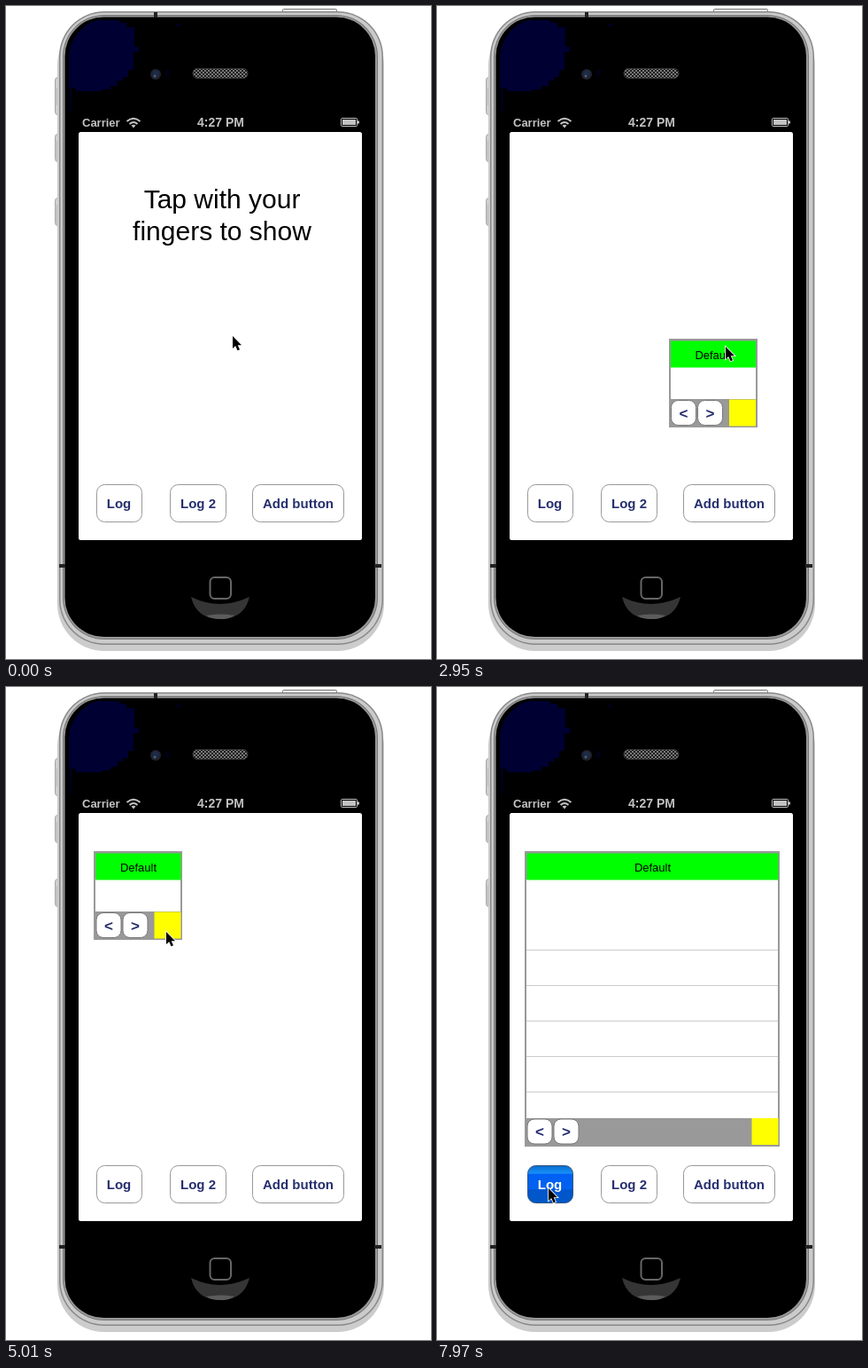
Write an HTML page that moves like this. It is 480 px wide and 736 px high and loops after 8 s.

```html
<!DOCTYPE html>
<html lang="en">
<head>
<meta charset="utf-8">
<title>Floating log window</title>
<style>
html, body { margin: 0; width: 100%; height: 100%; overflow: hidden; background: #fff; }
svg { display: block; }
text { font-family: "Liberation Sans", Arial, sans-serif; }
.mid { text-anchor: middle; }
.status { font-weight: bold; fill: #c2c2c2; }
.caption { font-size: 30px; text-anchor: middle; }
.button rect { fill: #fff; stroke: #999; }
.button text, .nav text { font-size: 15px; font-weight: bold; fill: #262f6e; text-anchor: middle; }
.nav rect { fill: #fff; stroke: #777; }
.nav text { font-size: 17px; }
.pressed rect { fill: url(#blue); stroke: #35527c; }
.pressed text { fill: #fff; }
</style>
</head>
<body>
<svg id="stage" width="480" height="736" viewBox="0 0 480 736">
  <defs>
    <linearGradient id="blue" x1="0" y1="0" x2="0" y2="1">
      <stop offset="0" stop-color="#0a6ccc"/>
      <stop offset=".2" stop-color="#1690f8"/>
      <stop offset=".24" stop-color="#0060f4"/>
      <stop offset=".62" stop-color="#0062ee"/>
      <stop offset=".66" stop-color="#0055cc"/>
      <stop offset="1" stop-color="#0058c8"/>
    </linearGradient>
    <linearGradient id="metal">
      <stop offset="0" stop-color="#bbb"/>
      <stop offset=".5" stop-color="#eee"/>
      <stop offset="1" stop-color="#777"/>
    </linearGradient>
    <pattern id="mesh" width="4" height="4" patternUnits="userSpaceOnUse">
      <rect width="4" height="4" fill="#1c1c1c"/>
      <path d="M0 0h2v2h-2zM2 2h2v2h-2z" fill="#777"/>
    </pattern>
  </defs>

  <!-- side and top keys -->
  <rect x="312.5" y="3.5" width="61" height="8" rx="1" fill="#eee" stroke="#777"/>
  <g fill="url(#metal)" stroke="#aaa">
    <rect x="55.5" y="80.5" width="8" height="42" rx="3"/>
    <rect x="55.5" y="144.5" width="8" height="31" rx="3"/>
    <rect x="55.5" y="216.5" width="8" height="31" rx="3"/>
  </g>
  <path d="M58.500 92v20M58.500 152v22M58.500 224v22" stroke="#777" stroke-width="1.500"/>

  <!-- body -->
  <rect x="58" y="14" width="369" height="713" rx="53" fill="#ccc"/>
  <rect x="60" y="6" width="366" height="714" rx="51" fill="#888"/>
  <rect x="61.500" y="7.500" width="363" height="711" rx="49.500" fill="#cbcbcb"/>
  <rect x="64" y="10" width="356" height="704" rx="47" fill="#777"/>
  <rect x="65" y="11" width="354" height="702" rx="46" fill="#999"/>
  <rect x="66.500" y="12.500" width="350.500" height="698.500" rx="44" fill="#000"/>
  <path d="M169 7v6M60 631h7M416 631h8" stroke="#222" stroke-width="4"/>
  <path d="M71 56Q73 32 96 18L104 16H128V19H136V24H145V46H150V52H144V72H138V80H132V84H126V90H118V94H108V96H79V92H71Z" fill="#003"/>
  <path d="M71 92h4v28h-3zM180 72h4v8h-4zM192 20h7v3h-7z" fill="#000018"/>

  <!-- camera, speaker, home key -->
  <circle cx="169" cy="77" r="6" fill="#22222c"/>
  <circle cx="169" cy="76" r="3.500" fill="#1b2c4c"/>
  <circle cx="168" cy="79" r="1.500" fill="#4a6078"/>
  <rect x="211" y="70.500" width="62" height="11" rx="5" fill="url(#mesh)" stroke="#333"/>
  <path d="M209 666Q242 682 275 666Q269 691 242 691Q215 691 209 666Z" fill="#353535"/>
  <path d="M226 687Q242 684 258 687Q252 691 242 691Q232 691 226 687Z" fill="#5c5c5c"/>
  <rect x="230.500" y="644" width="23.500" height="24" rx="5" fill="#000" stroke="#666" stroke-width="2"/>

  <!-- status bar -->
  <text class="status" x="86" y="136" font-size="13">Carrier</text>
  <text class="status mid" x="242.500" y="136" font-size="14">4:27 PM</text>
  <g fill="none" stroke="#c2c2c2" stroke-width="2">
    <path d="M136.500 130Q144 123.500 151.500 130M139.500 133Q144 129 148.500 133"/>
    <path d="M141.500 134.500Q144 133 146.500 134.500L144 137.500Z" fill="#c2c2c2" stroke="none"/>
    <rect x="378.500" y="126.500" width="18" height="9" rx="1" stroke-width="1"/>
    <path d="M380 131h15" stroke-width="6"/>
    <path d="M398 129.500v3" stroke-width="2"/>
  </g>
  <rect x="82" y="142" width="320" height="460" rx="2.500" fill="#fff"/>

  <g class="button" id="log"><rect x="102.500" y="539.500" width="51" height="42" rx="9"/><text x="127.500" y="566">Log</text></g>
  <g class="button"><rect x="185.500" y="539.500" width="63" height="42" rx="9"/><text x="217" y="566">Log 2</text></g>
  <g class="button"><rect x="278.500" y="539.500" width="103" height="42" rx="9"/><text x="330" y="566">Add button</text></g>

  <!-- floating window: the frame and table sit on whole pixels, title and bar may not -->
  <svg id="win">
    <rect width="100%" height="100%" fill="#999"/>
    <svg id="table" x="2" y="32">
      <rect width="100%" height="100%" fill="#fff"/>
      <path id="rows" stroke="#ccc"/>
    </svg>
    <g id="head">
      <rect id="title" x="2" y="2" height="30" fill="#0f0"/>
      <text class="mid" x="50%" y="22" font-size="13">Default</text>
    </g>
    <g id="bar">
      <g class="nav"><rect x="2.500" y="1" width="28" height="28" rx="8"/><text x="16.500" y="21">&lt;</text></g>
      <g class="nav"><rect x="32.500" y="1" width="28" height="28" rx="8"/><text x="46.500" y="21">&gt;</text></g>
      <rect id="grip" width="30" height="30" fill="#ff0"/>
    </g>
  </svg>

  <g class="caption">
    <g id="tap"><text x="244" y="228">Tap with your</text><text x="244" y="264">fingers to show</text></g>
    <text id="drag" x="231" y="247">drag</text>
    <text id="logging" x="245.500" y="468">log to window</text>
  </g>
  <path id="cursor" d="M0 0V14L3.200 11L5.500 16.200L8 15.200L5.700 10.200H10Z" stroke="#fff" stroke-width="1.600" paint-order="stroke"/>
</svg>
<script>
const LOOP = 8000, STEP = 40;
const $ = id => document.getElementById(id);

// Tables of [time, a, b]
const pointer = [
  [500, 256, 372], [1300, 153, 236], [2630, 153, 236], [2910, 333, 390],
  [2950, 326, 384], [3390, 181, 200], [3470, 181, 200], [3710, 181, 276],
  [5010, 181, 276], [5450, 369, 509], [5530, 369, 509], [5850, 125, 564],
  [7890, 125, 564], [7930, 126, 565]
];
const place = [[2630, 82, 222], [2950, 262, 375.5], [3390, 102, 195.5], [3470, 99.5, 185.5]];
const size = [[5010, 100, 100], [5450, 288, 332.5]];
const bursts = [5010, 2630, 500];

const half = v => Math.round(v * 2) / 2;

function at(keys, t) {
  const i = keys.findIndex(k => k[0] > t);
  if (i < 0) return keys[keys.length - 1].slice(1);
  if (i === 0) return keys[0].slice(1);
  const [t0, a0, b0] = keys[i - 1], [t1, a1, b1] = keys[i];
  const u = (t - t0) / (t1 - t0), e = u * u * (3 - 2 * u);
  return [half(a0 + (a1 - a0) * e), half(b0 + (b1 - b0) * e)];
}

// Motion advances in steps, counted from the start of each burst
function snap(t) {
  const start = bursts.find(b => t >= b) ?? 0;
  return start + Math.floor((t - start) / STEP) * STEP;
}

function set(id, attrs) {
  for (const name in attrs) $(id).setAttribute(name, attrs[name]);
}

function move(id, x, y) {
  set(id, { transform: `translate(${x} ${y})` });
}

function show(id, on) {
  $(id).style.display = on ? "" : "none";
}

function lines(first, pitch, count) {
  return Array.from({ length: count }, (_, i) => `M0 ${first + i * pitch + 0.5}H400`).join("");
}

function drawWindow(s) {
  const [x, y] = at(place, s), [w, h] = at(size, s);
  const left = Math.floor(x), top = Math.floor(y);
  const dx = x - left, dy = y - top;
  const width = Math.floor(dx + w), height = Math.floor(dy + h);
  set("win", { x: left, y: top, width, height });
  set("table", { width: width - 4, height: height - 64 });
  set("title", { width: w - 4 });
  set("grip", { x: w - 32 });
  move("head", dx, dy);
  move("bar", dx, dy + h - 32);
}

function draw(t) {
  const s = snap(t);
  const [cx, cy] = at(pointer, s).map(Math.round);
  drawWindow(s);
  move("cursor", cx, cy);
  set("rows", { d: t < 7970 ? lines(43, 44, 6) : lines(79, 40, 5) });
  $("log").classList.toggle("pressed", t >= 7930);
  show("win", t >= 900);
  show("tap", t < 500);
  show("drag", t >= 1330 && t < 2630);
  show("logging", t >= 5890 && t < 7890);
}

function tick() {
  draw(performance.now() % LOOP);
  requestAnimationFrame(tick);
}
tick();
</script>
</body>
</html>
```
